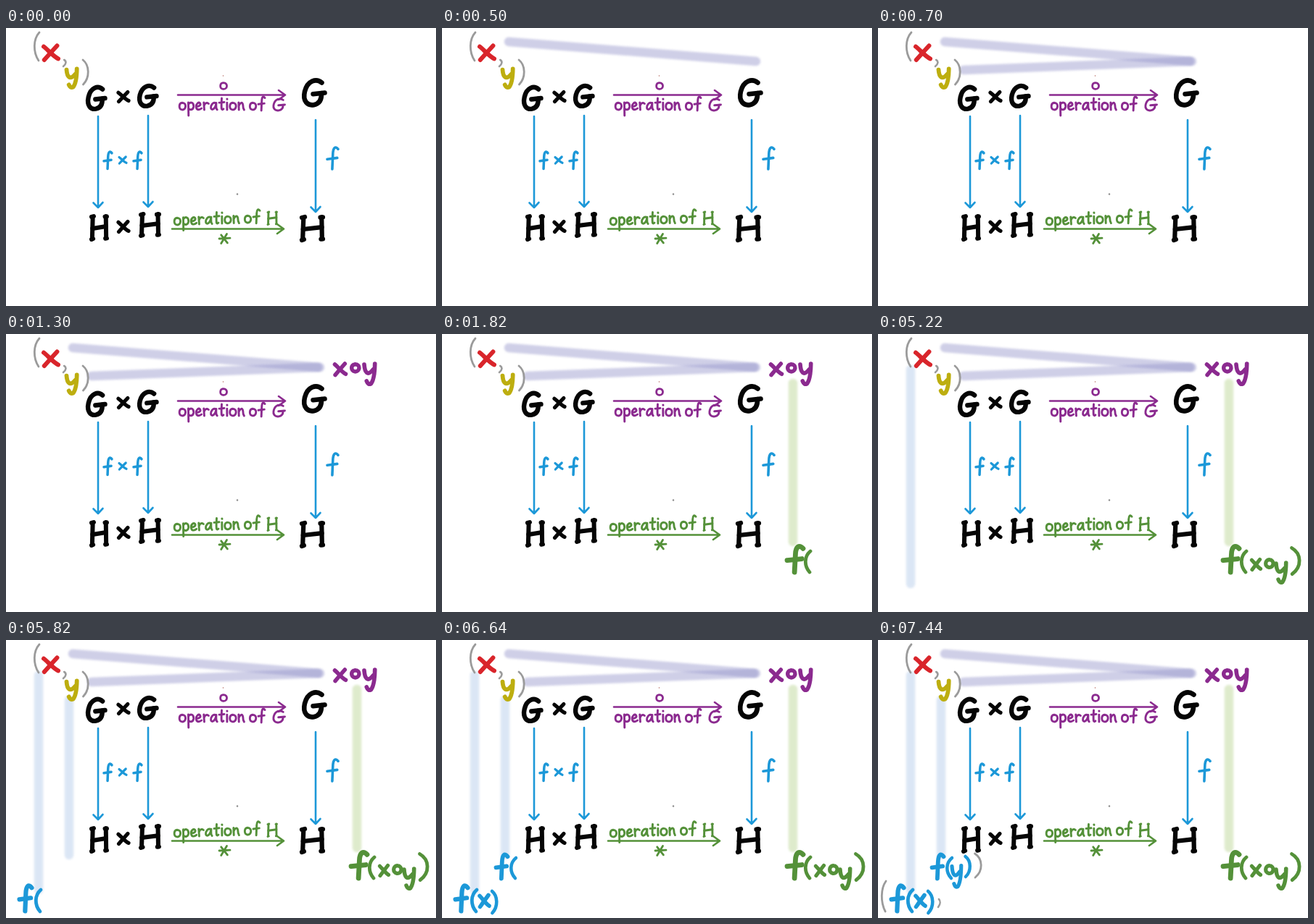
An HTML page that plays this animation: 593x384 px, repeating every 8 s.

```html
<!DOCTYPE html>
<html lang="en">
<head>
<meta charset="utf-8">
<title>Operation diagram</title>
<style>
  html, body { margin: 0; width: 100%; height: 100%; overflow: hidden; background: #fff; }
  svg { display: block; width: 100%; height: 100%; }
  path { fill: none; stroke-linecap: round; stroke-linejoin: round; vector-effect: non-scaling-stroke; }
  .band { opacity: .43; filter: blur(1.7px); }
</style>
</head>
<body>
<svg id="stage" viewBox="0 0 593 384"></svg>
<script>
const LOOP = 8000;
const stage = document.getElementById('stage');
const timed = [];

const BLACK = '#050505', GRAY = '#9b9b9b', RED = '#d9252b', OLIVE = '#bdae0f';
const PURPLE = '#8b2a8f', GREEN = '#549139', BLUE = '#1c98d8';
const LAVENDER = '#9191c9', PALE_GREEN = '#b5d18b', PALE_BLUE = '#aec7e8';

// Handwritten glyphs in a 100 x 100 box; "|" separates pen strokes.
const GLYPHS = {
  G: 'M86,9C60,-10 18,0 5,45C-6,86 20,103 48,99C76,94 86,76 84,52|M45,55L100,50',
  H: 'M8,2L4,98M0,3L14,0M0,100L10,97|M94,0L96,95M88,2L100,1M91,96L100,95|M6,53L95,44',
  x: 'M0,6C25,25 65,75 100,92|M92,0C65,30 30,70 4,100',
  y: 'M0,4C5,42 30,62 82,28|M98,0C97,40 88,80 62,97Q36,104 22,84',
  f: 'M100,8C75,-8 54,0 52,30L46,100|M0,54L92,48',
  '(': 'M100,0C-25,25 -25,70 85,100',
  ')': 'M0,0C125,22 130,72 6,100',
  ',': 'M30,0C110,20 110,60 0,100',
  o: 'M45,2C-10,5 -15,90 42,99C105,105 120,5 45,2',
  p: 'M8,0L12,100M10,12C50,-12 105,2 98,32C90,58 40,60 12,46',
  e: 'M10,55C60,55 95,35 75,10C50,-12 5,15 8,60C15,108 65,105 100,80',
  r: 'M5,0L15,100M12,45C25,10 60,-8 100,15',
  a: 'M85,12C40,-18 0,35 4,75C20,120 75,85 86,5Q80,85 100,98',
  t: 'M50,0C45,40 40,70 48,92Q60,104 85,92M0,38L100,34',
  i: 'M50,34L55,100M52,0L60,2',
  n: 'M5,0L10,100M8,45C35,-8 75,-10 80,35Q80,80 100,100',
  '*': 'M0,50L100,44M18,10L76,95M70,0L18,100'
};

function path(d, color, width, at = 0) {
  const el = document.createElementNS('http://www.w3.org/2000/svg', 'path');
  el.setAttribute('d', d);
  el.setAttribute('stroke', color);
  el.setAttribute('stroke-width', width);
  stage.append(el);
  if (at) timed.push({ el, at });
  return el;
}

// Fits a glyph to the box x, y, w, h; each stroke may have its own start time.
function glyph(ch, x, y, w, h, color, width, ...times) {
  GLYPHS[ch].split('|').forEach((d, i) => {
    path(d, color, width, times[i] ?? times.at(-1))
      .setAttribute('transform', `matrix(${w / 100} 0 0 ${h / 100} ${x} ${y})`);
  });
}

function band(d, color, at) {
  path(d, color, 12.5, at).classList.add('band');
}

function dot(x, y, color, size) {
  path(`M${x},${y}h.01`, color, size);
}

// Letter width, top and bottom relative to the x-height line.
const METRICS = {
  o: [9, 0, 10], p: [8, 0, 18], e: [8, 0, 10], r: [7, 0, 10], a: [9, 0, 10],
  t: [7, -6, 10], i: [2, -5, 10], n: [8, 0, 10], f: [9, -8, 11]
};

function phrase(text, x, y, slope, color) {
  const start = x;
  for (const ch of text) {
    if (ch === ' ') { x += 5; continue; }
    const [w, top, bottom] = METRICS[ch];
    glyph(ch, x, y + (x - start) * slope + top, w, bottom - top, color, 2.9);
    x += w + 2.8;
  }
}

function downArrow(x, top, tip) {
  path(`M${x},${top}V${tip}M${x - 6.5},${tip - 6.5}L${x},${tip}L${x + 6.5},${tip - 7}`, BLUE, 2.6);
}

function rightArrow(x, y, tip, color) {
  path(`M${x},${y}H${tip}M${tip - 9},${y - 6.5}L${tip},${y}L${tip - 9},${y + 6.5}`, color, 2.6);
}

// Highlighter bands
band('M92,19L433,46', LAVENDER, 500);
band('M118,58L430,46', LAVENDER, 700);
band('M484,68V287', PALE_GREEN, 1400);
band('M45,49V345', PALE_BLUE, 5220);
band('M87,83V297', PALE_BLUE, 5420);

// Pair (x, y)
glyph('(', 39, 6, 7, 39, GRAY, 2.8);
glyph('x', 52, 24.5, 20, 19.5, RED, 6);
glyph(',', 79, 44, 4, 9, GRAY, 2.6);
glyph('y', 83.5, 56.5, 14.5, 26, OLIVE, 5.8);
glyph(')', 106, 44, 7.5, 34, GRAY, 2.8);

// Diagram corners
glyph('G', 112.5, 82, 24, 30, BLACK, 6.4);
glyph('x', 155, 88.5, 14, 13, BLACK, 5.2);
glyph('G', 183.5, 80, 24, 28, BLACK, 6.4);
glyph('G', 410.5, 72.5, 29, 34, BLACK, 6.6);
glyph('H', 118, 260, 21, 32, BLACK, 6);
glyph('x', 155, 267.5, 14, 14, BLACK, 5.2);
glyph('H', 186, 257, 25, 30, BLACK, 6);
glyph('H', 408, 261, 29, 32, BLACK, 6.2);

// Operation on G
rightArrow(237, 92.5, 385, PURPLE);
glyph('o', 295.5, 75.5, 9.5, 9, PURPLE, 2.8);
phrase('operation of', 239, 103, 0, PURPLE);
glyph('G', 368.5, 98, 16, 16, PURPLE, 2.9);
dot(299.5, 66, '#b4675f', 1.5);

// Operation on H
rightArrow(229, 277.5, 383, GREEN);
phrase('operation of', 232, 262, -0.03, GREEN);
glyph('H', 361, 254, 12.5, 17.5, GREEN, 2.9);
glyph('*', 294, 284.5, 15, 13, GREEN, 2.8);

// Maps f
downArrow(127, 122, 248);
downArrow(196, 121, 247);
downArrow(427, 127, 254);
glyph('f', 135, 171, 11, 23.5, BLUE, 3.5);
glyph('x', 156, 178, 10, 9, BLUE, 3.2);
glyph('f', 176, 171, 11, 23.5, BLUE, 3.5);
glyph('f', 443, 165, 15, 30, BLUE, 3.6);
dot(319, 229.5, '#8c8c8c', 2.4);

// Product x o y
glyph('x', 453.5, 41, 15, 15.5, PURPLE, 5.6, 800, 1000);
glyph('o', 476.5, 41.5, 11, 10.5, PURPLE, 5.4, 1100);
glyph('y', 494, 41, 15, 28.5, PURPLE, 5.7, 1200, 1300);

// f(x o y)
glyph('f', 476, 293.5, 22, 35.5, GREEN, 6.8, 1600, 1700);
glyph('(', 501, 300, 7, 29, GREEN, 4.8, 1820);
glyph('x', 515.5, 311.5, 12, 14, GREEN, 5.2, 2020, 2120);
glyph('o', 534.5, 311.5, 11, 11, GREEN, 5.2, 2220);
glyph('y', 549, 316, 14, 27.5, GREEN, 5.6, 2420);
glyph(')', 570.5, 295.5, 11, 36, GREEN, 4.8, 2520);

// f(x)
glyph('f', 18.5, 339.5, 17, 35, BLUE, 6.2, 5520, 5720);
glyph('(', 41, 345, 7, 30, BLUE, 4.8, 5820);
glyph('x', 52, 352.5, 13, 16, BLUE, 5.6, 6020, 6120);
glyph(')', 69, 347, 6.5, 30, BLUE, 4.6, 6240);

// f(y)
glyph('f', 74.5, 296.5, 16, 33, BLUE, 5.8, 6440, 6540);
glyph('(', 95, 301, 7, 28, BLUE, 4.5, 6640);
glyph('y', 102, 311.5, 13, 30, BLUE, 5.2, 6840);
glyph(')', 120.5, 299, 6.5, 28, BLUE, 4.5, 7040);

// Pair brackets around the images
glyph('(', 5, 333, 6, 42, GRAY, 2.8, 7140);
glyph(',', 83, 358, 3, 11, GRAY, 2.6, 7340);
glyph(')', 133.5, 295, 9, 33, GRAY, 2.8, 7440);

const begin = performance.now();
function draw() {
  const time = (performance.now() - begin) % LOOP;
  for (const { el, at } of timed) el.style.display = time >= at ? '' : 'none';
  requestAnimationFrame(draw);
}
draw();
</script>
</body>
</html>
```
